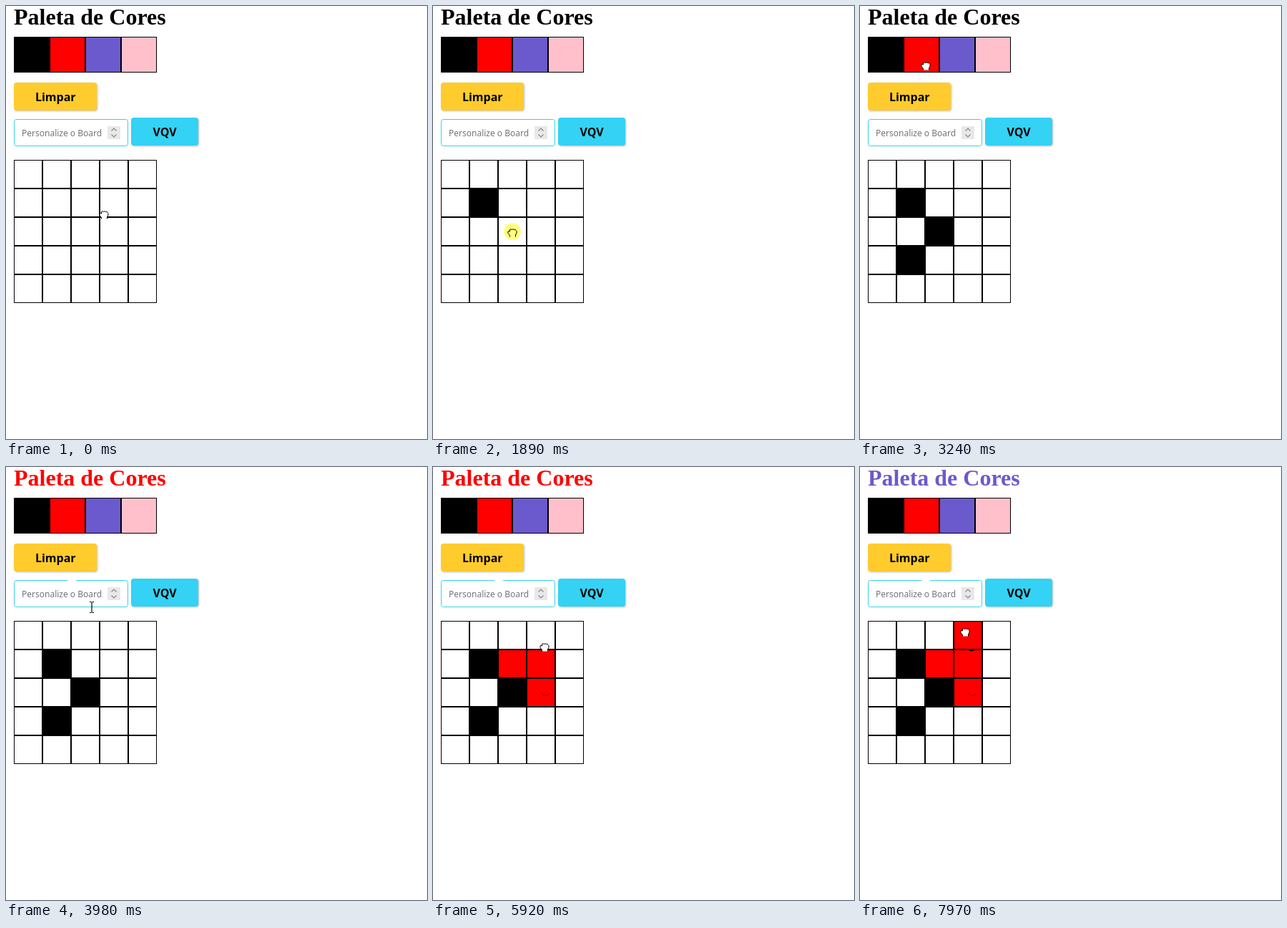
These frames come from a looping animation (589x605 px, 8000 ms). An HTML page:

```html
<!DOCTYPE html>
<html lang="pt">
<head>
<meta charset="utf-8">
<title>Paleta de Cores</title>
<style>
  html, body { margin: 0; width: 100%; height: 100%; overflow: hidden; background: #fff; }
  svg { display: block; }
  #title { font: bold 32px "Liberation Serif", serif; }
  .label { font: bold 16px "Noto Sans", sans-serif; text-anchor: middle; }
  .hint { font: 12px "Noto Sans", sans-serif; fill: #757575; }
  .button { filter: drop-shadow(1.5px 1.5px 1px #bbb); }
  #halo { mix-blend-mode: multiply; }
</style>
</head>
<body>
<svg width="589" height="605" viewBox="0 0 589 605">
  <text id="title" x="11" y="26">Paleta de Cores</text>
  <g id="palette" stroke="#000"></g>
  <rect class="button" x="11" y="107" width="116" height="39" rx="4" fill="#ffcb2d"/>
  <text class="label" x="69.3" y="133">Limpar</text>
  <rect x="11.5" y="158.5" width="159" height="37" rx="3" fill="#fff" stroke="#35d2e8"/>
  <text class="hint" x="22" y="182">Personalize o Board</text>
  <rect x="142" y="168" width="18" height="18" fill="#e8e8e8"/>
  <path d="M147.5 174.5l3.5-3.5 3.5 3.5M147.5 179.5l3.5 3.5 3.5-3.5" fill="none" stroke="#888" stroke-width="1.2"/>
  <rect class="button" x="175" y="156" width="94" height="39" rx="4" fill="#34d2f4"/>
  <text class="label" x="222" y="182">VQV</text>
  <g id="board" stroke="#000"></g>
  <!-- traces the pointer leaves behind -->
  <ellipse data-from="3500" cx="92" cy="158.5" rx="6" ry="1" fill="#fff"/>
  <path data-from="5750" d="M151.5 315l3 4h6l2-3" fill="none" stroke="#900"/>
  <path data-from="6150" d="M152 256q4 3 8 0z"/>
  <g id="pointer">
    <path id="hand" d="M-3.5 5.5V3.5L-6 .5V-2Q-5-3.2-3.5-2V-4.5Q-2-6-.5-4.5Q1-6 2.5-4.5Q4.5-5.5 5-3.5Q6.5-3 6 0L4.5 3V5.5" fill="#fff" stroke="#000"/>
    <path id="beam" d="M-3-7.5h2.5M.5-7.5H3M0-7V7M-3 7.5h2.5M.5 7.5H3" fill="none" stroke="#000" stroke-width="1.2"/>
    <circle id="halo" cy="-2" r="12" fill="#ffff80"/>
  </g>
</svg>
<script>
const LOOP = 8000, LEFT = 11, PALETTE_TOP = 43, BOARD_TOP = 215, SWATCH = 50, CELL = 40;
const colors = ['#000', '#f00', '#6a5acd', '#ffc0cb'];
const $ = id => document.getElementById(id);

const home = { x: 137, y: 292 };
const moves = [
  { leave: 60, arrive: 740, x: 70, y: 278, click: 1150 },
  { leave: 1200, arrive: 1820, x: 111, y: 317, click: 1960 },
  { leave: 2000, arrive: 2400, x: 72, y: 354, click: 2500 },
  { leave: 2555, arrive: 3370, x: 93, y: 77, click: 3640 },
  { leave: 3780, arrive: 3980, x: 120, y: 196 },
  { leave: 3990, arrive: 4310, x: 111, y: 266, click: 4515 },
  { leave: 4560, arrive: 4710, x: 157, y: 280, click: 4975 },
  { leave: 5080, arrive: 5300, x: 157, y: 313, click: 5510 },
  { leave: 5680, arrive: 5980, x: 156, y: 250 },
  { leave: 6080, arrive: 6330, x: 152, y: 223, click: 6450 },
  { leave: 6880, arrive: 7150, x: 136, y: 77, click: 7280 },
  { leave: 7430, arrive: 7960, x: 147, y: 231 }
];
const clicks = moves.filter(m => m.click);

function addSquare(parent, x, y, size, fill) {
  const r = document.createElementNS('http://www.w3.org/2000/svg', 'rect');
  const attrs = { x: x + .5, y: y + .5, width: size - 1, height: size - 1, fill };
  for (const k in attrs) r.setAttribute(k, attrs[k]);
  return parent.appendChild(r);
}

colors.forEach((c, i) => addSquare($('palette'), LEFT + SWATCH * i, PALETTE_TOP, SWATCH, c));
const cells = Array.from({ length: 25 }, (_, i) =>
  addSquare($('board'), LEFT + CELL * (i % 5), BOARD_TOP + CELL * Math.floor(i / 5), CELL, '#fff'));
const traces = document.querySelectorAll('[data-from]');
const show = (el, on) => el.setAttribute('visibility', on ? 'visible' : 'hidden');

function pointerAt(t) {
  let { x, y } = home;
  for (const m of moves) {
    if (t < m.leave) break;
    const k = Math.min(1, (t - m.leave) / (m.arrive - m.leave));
    const ease = k * (2 - k);
    x += (m.x - x) * ease;
    y += (m.y - y) * ease;
  }
  return [Math.round(x), Math.round(y)];
}

// A click on the palette picks a colour; a click on the board paints with it.
function paint(t) {
  let ink = colors[0];
  const fills = cells.map(() => '#fff');
  for (const { click, x, y } of clicks) {
    if (t < click) break;
    if (y < BOARD_TOP) ink = colors[Math.floor((x - LEFT) / SWATCH)];
    else fills[Math.floor((y - BOARD_TOP) / CELL) * 5 + Math.floor((x - LEFT) / CELL)] = ink;
  }
  cells.forEach((cell, i) => cell.setAttribute('fill', fills[i]));
  $('title').setAttribute('fill', ink);
}

function draw(now) {
  const t = now % LOOP;
  paint(t);
  traces.forEach(el => show(el, t >= +el.dataset.from));

  const [x, y] = pointerAt(t);
  const overInput = x >= 11 && x <= 171 && y >= 158 && y <= 197;
  $('pointer').setAttribute('transform', `translate(${x} ${y})`);
  show($('hand'), !overInput);
  show($('beam'), overInput);
  show($('halo'), clicks.some(({ click }) => t >= click - 70 && t < click));
  requestAnimationFrame(() => draw(performance.now() - start));
}
const start = performance.now();
draw(0);
</script>
</body>
</html>
```
